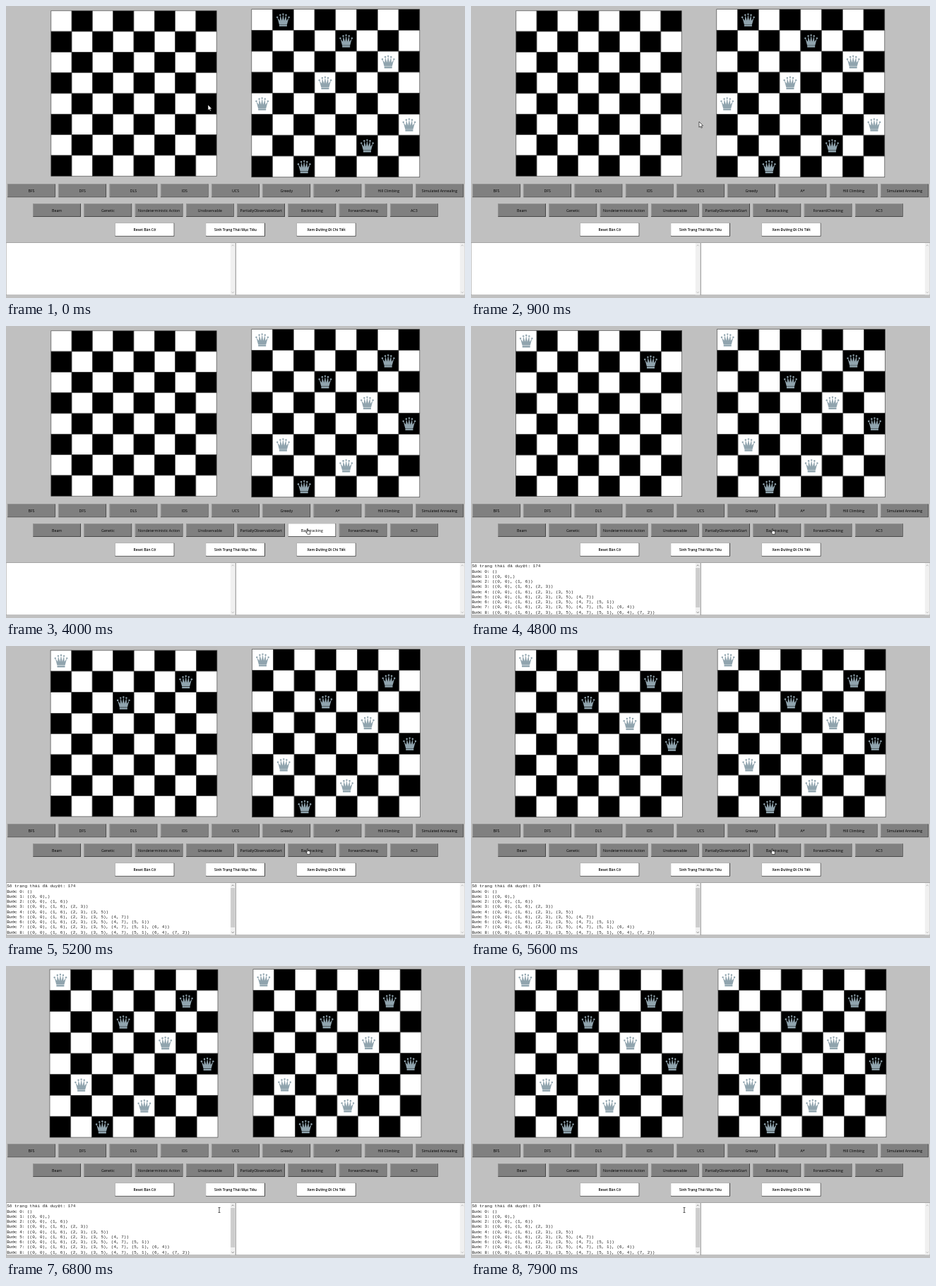
Write an HTML page with a canvas that moves like this. It is 650 px wide and 414 px high and loops after 8 s.

```html
<!DOCTYPE html>
<html lang="vi">
<head>
<meta charset="utf-8">
<title>8 quân hậu</title>
<style>
  html, body { margin: 0; width: 100%; height: 100%; overflow: hidden; background: #c0c0c0; }
  canvas { display: block; width: 650px; height: 414px; }
</style>
</head>
<body>
<canvas id="stage"></canvas>
<script>
const W = 650, H = 414, LOOP = 8000;
const NEW_GOAL_AT = 2900, PRESS_AT = 3900, RESULT_AT = 4100, FIRST_QUEEN_AT = 4400, QUEEN_EVERY = 300;
const TEXT_TOP = 336;

const canvas = document.getElementById('stage');
const ctx = canvas.getContext('2d');
const ratio = window.devicePixelRatio || 1;
canvas.width = W * ratio;
canvas.height = H * ratio;

// One digit per row: the column of its queen
const columns = digits => [...digits].map(Number);
const FIRST_GOAL = columns('14630752');
const SOLUTION = columns('06357142');

const log = ['Số trạng thái đã duyệt: 174'];
for (let n = 0; n <= 8; n++) {
  const cells = SOLUTION.slice(0, n).map((col, row) => `(${row}, ${col})`).join(', ');
  log.push(`Bước ${n}: (${cells}${n === 1 ? ',' : ''})`);
}

// Each row of buttons is centred on the stage
function buttonRow(text, y, step, w, white) {
  const labels = text.split('|');
  const left = W / 2 - (labels.length - 1) * step / 2 - w / 2;
  return labels.map((label, i) => ({ label, x: left + i * step, y, w, h: 18.8, white }));
}
const buttons = [
  ...buttonRow('BFS|DFS|DLS|IDS|UCS|Greedy|A*|Hill Climbing|Simulated Annealing', 252.4, 72.25, 67.6),
  ...buttonRow('Beam|Genetic|Nondeterministic Action|Unobservable|PartiallyObservableStart|Backtracking|ForwardChecking|AC3',
    280.2, 72.25, 67.6),
  ...buttonRow('Reset Bàn Cờ|Sinh Trạng Thái Mục Tiêu|Xem Đường Đi Chi Tiết', 307.8, 128.6, 83.8, true)
];

// The sweep makes the first move a wide loop over the goal board
const moves = [
  { from: 100, to: 900, x: 323, y: 164, sweep: true },
  { from: 1600, to: 1700, x: 331, y: 167 },
  { from: 1800, to: 2500, x: 332.5, y: 318 },
  { from: 2900, to: 3700, x: 426.3, y: 287.6 },
  { from: 5600, to: 6300, x: 302, y: 342 },
  { from: 6300, to: 6400, x: 302, y: 346 }
];

function pointerAt(t) {
  let x = 286, y = 140;
  for (const m of moves) {
    const k = Math.max(0, Math.min(1, (t - m.from) / (m.to - m.from)));
    const eased = 1 - (1 - k) ** 2;
    x += (m.x - x) * eased;
    y += (m.y - y) * eased;
    if (m.sweep) {
      x += 245 * Math.sin(Math.PI * k);
      y -= 60 * Math.sin(2 * Math.PI * k);
    }
  }
  return [x, y];
}

function rect(x, y, w, h, color) {
  ctx.fillStyle = color;
  ctx.fillRect(x, y, w, h);
}

function drawQueen(x, y) {
  ctx.save();
  ctx.translate(x, y);
  ctx.fillStyle = '#90a4ae';
  ctx.beginPath();
  ctx.moveTo(-5.6, 6.3);
  for (let i = -2; i <= 2; i++) {
    const tipX = 4.1 * i, tipY = 1.1 * i * i - 7.8;
    ctx.lineTo(tipX, tipY);
    if (i < 2) ctx.lineTo(4 * (i + 0.5) * 0.8, 1.2);
  }
  ctx.lineTo(5.6, 6.3);
  ctx.fill();
  for (let i = -2; i <= 2; i++) {
    ctx.beginPath();
    ctx.arc(4.1 * i, 1.1 * i * i - 8, 1.2, 0, 2 * Math.PI);
    ctx.fill();
  }
  ctx.fillRect(-5.5, 6.8, 11, 2.5);
  ctx.restore();
}

// Rows and columns that hold a queen are slightly larger
function drawBoard(cx, cy, queens) {
  const index = [...Array(8).keys()];
  const edges = (center, isUsed) => {
    const marks = [0];
    for (const i of index) marks.push(marks[i] + (isUsed(i) ? 29.75 : 29.3));
    return marks.map(m => center - marks[8] / 2 + m);
  };
  const xs = edges(cx, c => queens.includes(c));
  const ys = edges(cy, r => r < queens.length);
  ctx.strokeStyle = '#4a4a4a';
  ctx.lineWidth = 0.7;
  for (const r of index) for (const c of index) {
    const box = [xs[c], ys[r], xs[c + 1] - xs[c], ys[r + 1] - ys[r]];
    rect(...box, (r + c) % 2 ? '#000' : '#fff');
    ctx.strokeRect(...box);
  }
  queens.forEach((c, r) => drawQueen((xs[c] + xs[c + 1]) / 2, (ys[r] + ys[r + 1]) / 2));
}

function drawButton({ label, x, y, w, h, white }, pressed) {
  const bright = white || pressed;
  rect(x, y, w, h, '#383838');
  rect(x, y, w - 0.9, h - 0.9, bright ? '#f0f0f0' : '#b0b0b0');
  rect(x + 0.5, y + 0.5, w - 1.4, h - 1.4, bright ? '#fff' : '#808080');
  ctx.fillStyle = '#000';
  ctx.font = `${white ? '600 5px' : '5.25px'} "Open Sans", sans-serif`;
  ctx.textAlign = 'center';
  ctx.fillText(label, x + w / 2, y + h / 2 + 1.9);
}

function drawTextBox(x, w, lines) {
  const height = 73.5, bar = x + w - 7.2;
  rect(x, TEXT_TOP - 0.5, w, height + 1, '#8c8c8c');
  rect(x + 0.5, TEXT_TOP, w - 1, height, '#fff');
  rect(bar, TEXT_TOP, 6.7, height, '#f0f0f0');
  if (lines.length) rect(bar + 0.4, 343, 5.9, 56, '#cdcdcd');
  ctx.lineWidth = 0.7;
  ctx.strokeStyle = lines.length ? '#606060' : '#a8a8a8';
  for (const [y, d] of [[339.5, 0.8], [406, -0.8]]) {
    ctx.beginPath();
    ctx.moveTo(bar + 1.8, y + d);
    ctx.lineTo(bar + 3.4, y - d);
    ctx.lineTo(bar + 5, y + d);
    ctx.stroke();
  }
  ctx.fillStyle = '#1c1c1c';
  ctx.font = '6px "Liberation Mono", monospace';
  ctx.textAlign = 'left';
  lines.forEach((line, i) => ctx.fillText(line, x + 1.2, 342.4 + i * 7.25));
}

const arrow = new Path2D('M0 0V8L1.9 6.4 3.1 9 4.4 8.4 3.2 5.9 5.6 5.7Z');
const hand = new Path2D('M0 0H1.2V2.8L4.4 3.4V7.6H.6L-1.6 4.6 0 4.8Z');

function drawPointer(x, y) {
  const overButton = buttons.some(b => x > b.x && x < b.x + b.w && y > b.y && y < b.y + b.h);
  ctx.save();
  ctx.translate(x, y);
  if (y > TEXT_TOP) {
    rect(-0.4, -3.5, 0.8, 7, '#222');
    for (const end of [-3.7, 3]) rect(-1.5, end, 3, 0.7, '#222');
  } else {
    const shape = overButton ? hand : arrow;
    ctx.lineWidth = 0.6;
    ctx.fillStyle = '#fff';
    ctx.strokeStyle = '#000';
    ctx.fill(shape);
    ctx.stroke(shape);
  }
  ctx.restore();
}

function draw(t) {
  const placed = Math.max(0, Math.min(8, Math.floor((t - FIRST_QUEEN_AT) / QUEEN_EVERY) + 1));
  const pressing = t >= PRESS_AT && t < RESULT_AT;
  ctx.setTransform(ratio, 0, 0, ratio, 0, 0);
  rect(0, 0, W, H, '#c0c0c0');
  drawBoard(181, 124, SOLUTION.slice(0, placed));
  drawBoard(466.8 + placed * 0.27, 123.7, t < NEW_GOAL_AT ? FIRST_GOAL : SOLUTION);
  for (const b of buttons) drawButton(b, pressing && b.label === 'Backtracking');
  drawTextBox(0, 325, t < RESULT_AT ? [] : log);
  drawTextBox(325.5, 324.5, []);
  drawPointer(...pointerAt(t));
}

function tick() {
  draw(performance.now() % LOOP);
  requestAnimationFrame(tick);
}
tick();
</script>
</body>
</html>
```
